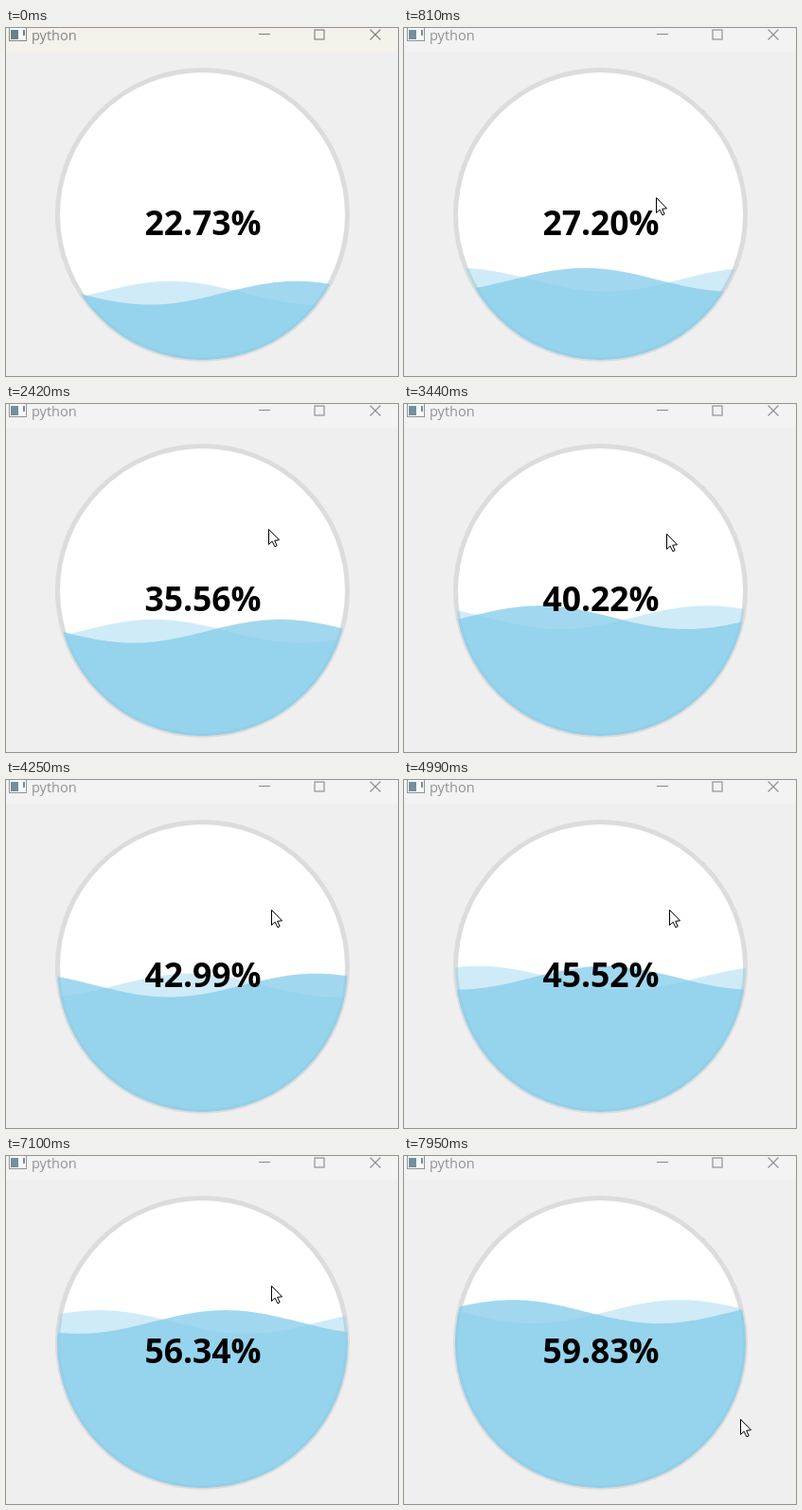
An HTML page with a canvas for the animation above (8 s loop, 414 by 368 pixels).

```html
<!DOCTYPE html>
<html lang="en">
<head>
<meta charset="utf-8">
<title>Water gauge</title>
<style>
  html, body { margin: 0; width: 100%; height: 100%; overflow: hidden; background: #efefef; }
  canvas { display: block; }
</style>
</head>
<body>
<canvas id="stage" width="414" height="368"></canvas>
<script>
const ctx = document.getElementById('stage').getContext('2d');
const TAU = Math.PI * 2;
const LOOP = 8000, TICKS_PER_SECOND = 15;
const CENTER = { x: 207.5, y: 197.5 };
const WAVELENGTH = 310, AMPLITUDE = 12.4;

// tick, percent, x of the front crest
const WATER = [
  [0, 22.73, -3], [12, 27.2, -119], [36, 35.56, -330.5], [51, 40.22, -477],
  [74, 45.52, -718], [93, 52.86, -890.5], [119, 59.83, -1125.5]
];

// tick, x, y of the pointer tip
const POINTER = [
  [7, 337, 312], [12, 266, 179], [36, 277, 132], [51, 277, 137],
  [60, 280, 137], [108, 280, 137], [119, 355, 278]
];

const linear = f => f;
const smooth = f => f * f * (3 - 2 * f);

function sample(keys, tick, ease) {
  const i = Math.max(1, keys.findIndex(k => k[0] >= tick));
  const [from, ...a] = keys[i - 1];
  const [to, ...b] = keys[i];
  const f = ease((tick - from) / (to - from));
  return a.map((v, j) => v + (b[j] - v) * f);
}

function line(x1, y1, x2, y2) {
  ctx.beginPath();
  ctx.moveTo(x1, y1);
  ctx.lineTo(x2, y2);
  ctx.stroke();
}

function disc(radius) {
  ctx.beginPath();
  ctx.arc(CENTER.x, CENTER.y, radius, 0, TAU);
}

function titleBar(active) {
  const ink = active ? '#858585' : '#929292';
  ctx.fillStyle = active ? '#f4f2eb' : '#f3f3f3';
  ctx.fillRect(0, 0, 414, 26);

  ctx.fillStyle = '#fafafa';
  ctx.fillRect(3, 0, 19, 14);
  ctx.strokeStyle = ink;
  ctx.lineWidth = 1;
  ctx.strokeRect(3.5, -1.5, 18, 15);
  ctx.fillStyle = active ? '#66838c' : '#74909a';
  ctx.fillRect(5, 2, 8, 10);
  ctx.fillRect(18, 2, 2, 6);

  ctx.fillStyle = ink;
  ctx.font = '14.5px "Open Sans", "Noto Sans", sans-serif';
  ctx.textAlign = 'left';
  ctx.fillText('python', 27, 13);

  ctx.lineWidth = 1.2;
  line(267, 6.5, 279, 6.5);
  ctx.strokeRect(326, 2, 10, 10);
  line(384.5, 1.5, 395.5, 12.5);
  line(395.5, 1.5, 384.5, 12.5);
}

function wave(level, crest, height, alpha) {
  ctx.beginPath();
  ctx.moveTo(50, 360);
  for (let x = 50; x <= 364; x += 2) {
    ctx.lineTo(x, level - height * Math.cos(TAU * (x - crest) / WAVELENGTH));
  }
  ctx.lineTo(364, 360);
  ctx.fillStyle = `rgba(135, 206, 235, ${alpha})`;
  ctx.fill();
}

function gauge(percent, crest) {
  disc(153);
  ctx.fillStyle = '#fff';
  ctx.fill();
  ctx.strokeStyle = '#dcdcdc';
  ctx.lineWidth = 5;
  ctx.stroke();

  const level = 351 - 3.115 * percent;
  ctx.save();
  disc(153.5);
  ctx.clip();
  wave(level, crest + 22, -AMPLITUDE, 0.4);
  wave(level, crest, AMPLITUDE, 0.78);
  ctx.restore();

  ctx.fillStyle = '#000';
  ctx.font = '700 35.5px "Open Sans", "Noto Sans", sans-serif';
  ctx.textAlign = 'center';
  ctx.fillText(percent.toFixed(2) + '%', 208, 219);
}

function pointer(x, y) {
  ctx.save();
  ctx.translate(Math.round(x) + 0.5, Math.round(y) + 0.5);
  ctx.beginPath();
  ctx.moveTo(0, 0);
  ctx.lineTo(0, 16);
  ctx.lineTo(3.7, 12.7);
  ctx.lineTo(6.3, 18.3);
  ctx.lineTo(8.6, 17.3);
  ctx.lineTo(6.2, 11.8);
  ctx.lineTo(11, 11.3);
  ctx.closePath();
  ctx.fillStyle = '#fff';
  ctx.fill();
  ctx.strokeStyle = '#000';
  ctx.lineWidth = 1;
  ctx.stroke();
  ctx.restore();
}

function draw(time) {
  const tick = Math.floor(time / 1000 * TICKS_PER_SECOND);
  ctx.fillStyle = '#efefef';
  ctx.fillRect(0, 0, 414, 368);
  titleBar(tick < 2);
  gauge(...sample(WATER, tick, linear));
  if (tick >= POINTER[0][0]) pointer(...sample(POINTER, tick, smooth));
}

const start = performance.now();
function loop() {
  draw((performance.now() - start) % LOOP);
  requestAnimationFrame(loop);
}
loop();
</script>
</body>
</html>
```
